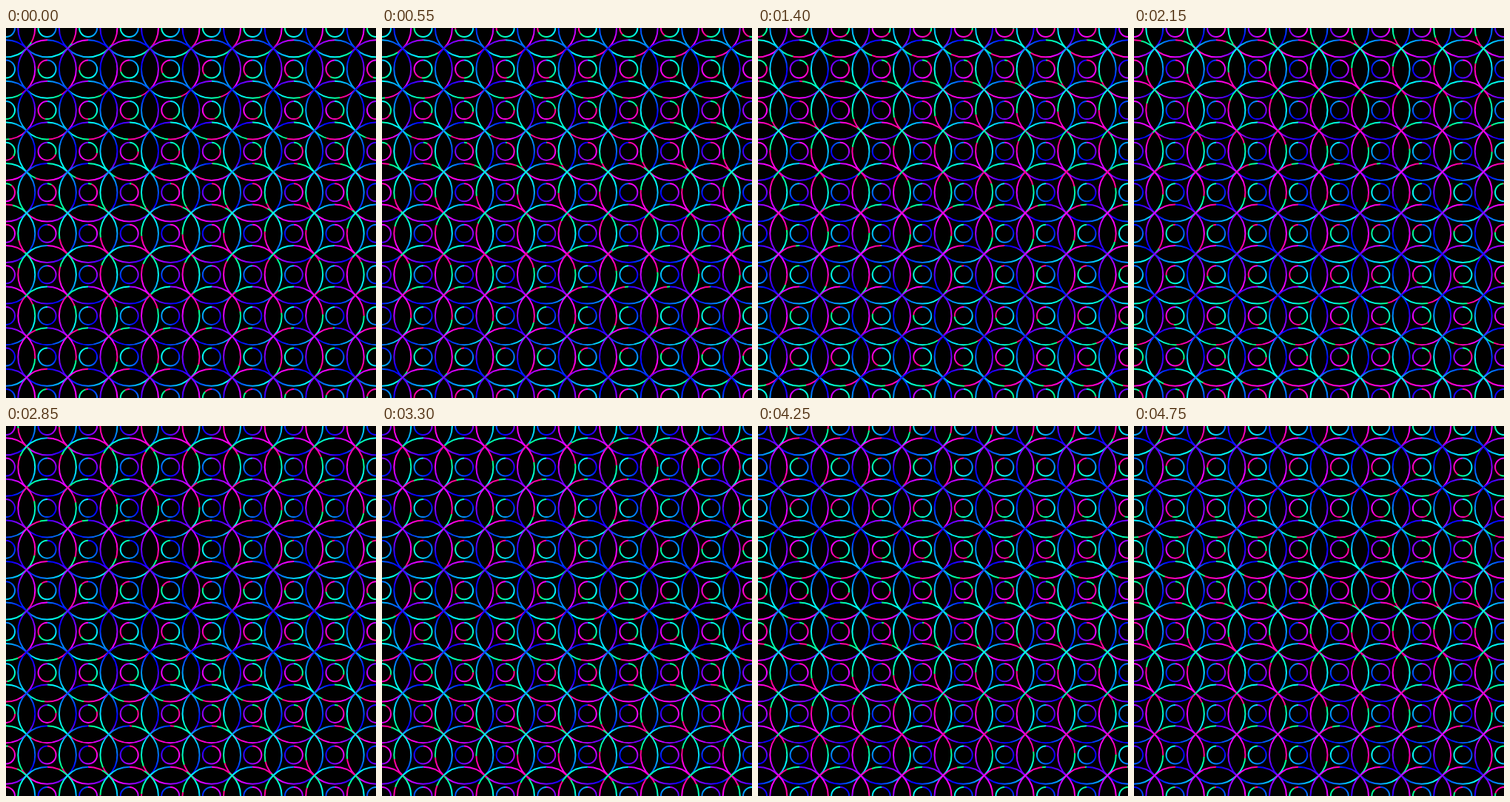
These frames come from a looping animation (500 by 500 pixels, 4.8 s). An HTML page with a canvas:

```html
<!DOCTYPE html>
<html>
<head>
<meta charset="utf-8">
<style>
  html, body { margin: 0; width: 100%; height: 100%; overflow: hidden; background: #000; }
  canvas { display: block; }
</style>
</head>
<body>
<canvas id="stage" width="500" height="500"></canvas>
<script>
const ctx = document.getElementById('stage').getContext('2d');
const LOOP = 4800, STEP = 50, CELLS = 9, GAP = 500 / CELLS, TOP = -Math.PI / 2;

// Colour cycles gained clockwise from the top; the half turn leaves a seam there.
const rings = [
  { radius: GAP / Math.SQRT2, turns: -1.5 },
  { radius: 12, turns: 0.5 }
];

// Hue falls from pink to green, then jumps back to pink.
const color = phase => `hsl(${330 - 180 * (phase - Math.floor(phase))}, 100%, 50%)`;

function ringGradient(x, y, turns, phase) {
  const g = ctx.createConicGradient(TOP, x, y);
  const dir = Math.sign(turns), tiny = 1e-6 * dir, end = phase + turns;
  g.addColorStop(0, color(phase + tiny));
  // Stops at every sixth of a cycle keep the hue ramp straight.
  const first = dir > 0 ? Math.ceil(phase * 6) : Math.floor(phase * 6);
  for (let k = first; (end - k / 6) * dir > 0; k += dir) {
    const at = Math.min(1, Math.max(0, (k / 6 - phase) / turns));
    g.addColorStop(at, color(k / 6 - tiny));
    g.addColorStop(at, color(k / 6 + tiny));
  }
  g.addColorStop(1, color(end - tiny));
  return g;
}

function draw(time) {
  const cycle = Math.floor((time % LOOP) / STEP) * STEP / LOOP;
  ctx.fillStyle = '#000';
  ctx.fillRect(0, 0, 500, 500);
  ctx.lineWidth = 2;
  for (const { radius, turns } of rings) {
    for (let row = 0; row <= CELLS; row++) {
      for (let col = 0; col <= CELLS; col++) {
        const x = col * GAP, y = row * GAP;
        const phase = (row + col / CELLS) / CELLS + cycle - 0.5;
        ctx.strokeStyle = ringGradient(x, y, turns, phase);
        ctx.beginPath();
        ctx.arc(x, y, radius, 0, 2 * Math.PI);
        ctx.stroke();
      }
    }
  }
}

const begin = performance.now();
function tick() {
  draw(performance.now() - begin);
  requestAnimationFrame(tick);
}
tick();
</script>
</body>
</html>
```
